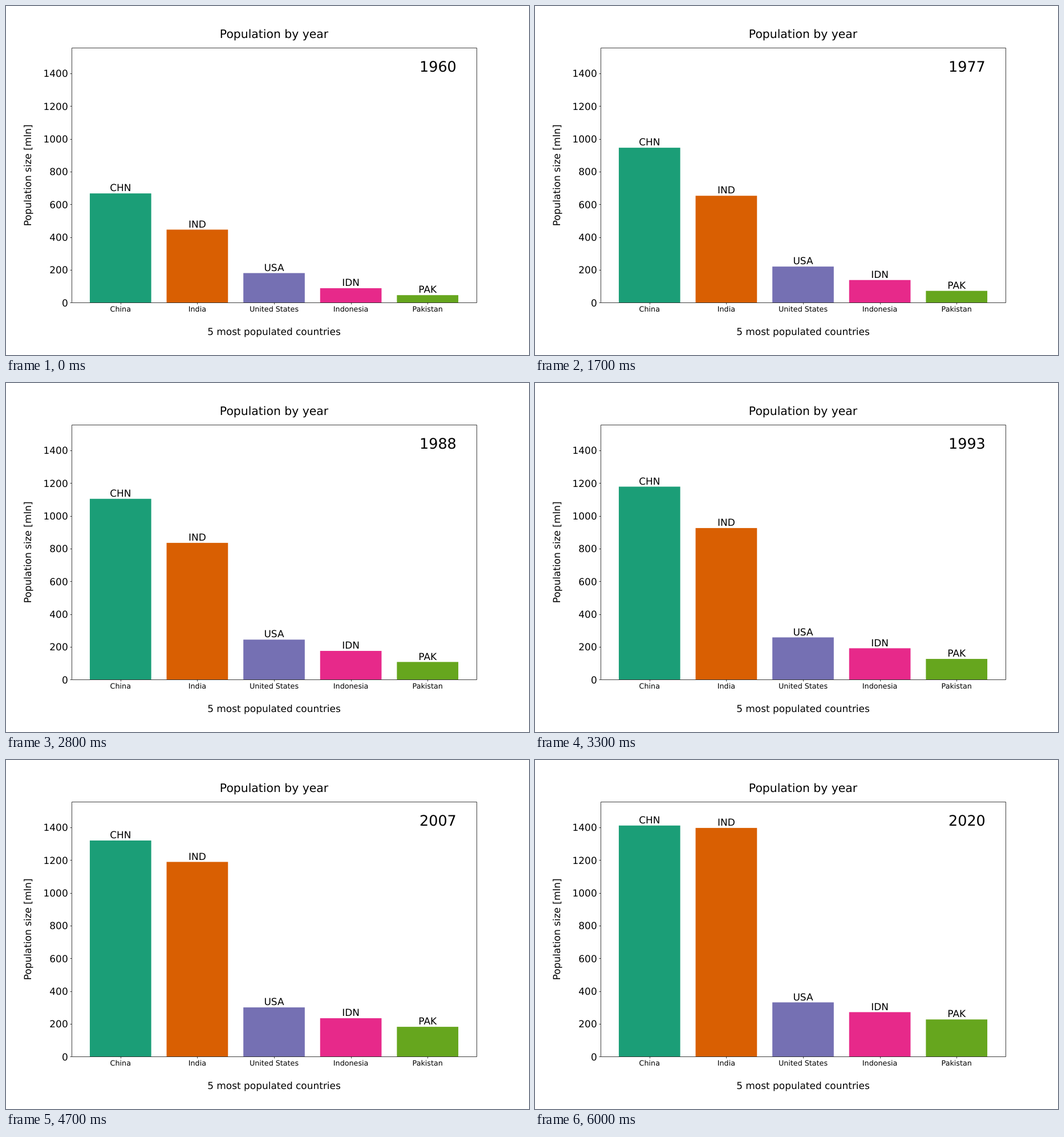
Write an HTML page that moves like this. It is 917 px wide and 611 px high and loops after 6100 ms.

```html
<!DOCTYPE html>
<html lang="en">
<head>
<meta charset="utf-8">
<title>Population by year</title>
<style>
  html, body { margin: 0; width: 100%; height: 100%; overflow: hidden; background: #fff; }
  svg { display: block; width: 917px; height: 611px; }
  text { font-family: "DejaVu Sans", sans-serif; text-rendering: geometricPrecision; }
  .axis { fill: none; stroke: #000; stroke-width: .75; }
</style>
</head>
<body>
<svg id="chart" viewBox="0 0 917 611"></svg>
<script>
const FIRST = 1960, YEARS = 61, STEP = 100;
const BASE = 519.4, SCALE = 0.2868;
const LEFT = 114.63, SLOT = 134.61, BAR = SLOT * 0.8;

// Keys are millions of people, evenly spread from the first year to the last.
const countries = [
  { name: 'China', code: 'CHN', color: '#1b9e77', keys: [667, 764, 916, 1016, 1135, 1236, 1304, 1359, 1411] },
  { name: 'India', code: 'IND', color: '#d95f02', keys: [446, 623.5, 870.5, 1154.6, 1396.4] },
  { name: 'United States', code: 'USA', color: '#7570b3', keys: [180.7, 216, 249.6, 295.5, 331.5] },
  { name: 'Indonesia', code: 'IDN', color: '#e7298a', keys: [88.3, 131.8, 182.2, 228.8, 271.9] },
  { name: 'Pakistan', code: 'PAK', color: '#66a61e', keys: [46, 67.2, 115.4, 175, 227.2] }
];

const chart = document.getElementById('chart');

function add(tag, attrs, content = '') {
  const el = document.createElementNS('http://www.w3.org/2000/svg', tag);
  for (const key in attrs) el.setAttribute(key, attrs[key]);
  el.textContent = content;
  return chart.appendChild(el);
}

function label(content, x, y, size = 16.97, anchor = 'middle') {
  return add('text', { x, y, 'text-anchor': anchor, 'font-size': size }, content);
}

const line = d => add('path', { class: 'axis', d });
const yOf = value => BASE - value * SCALE;

// Catmull-Rom curve through the keys, u from 0 to 1.
function curve(keys, u) {
  const last = keys.length - 1;
  const i = Math.min(Math.floor(u * last), last - 1), t = u * last - i;
  const b = keys[i], c = keys[i + 1];
  const a = keys[i - 1] ?? 2 * b - c, d = keys[i + 2] ?? 2 * c - b;
  return b + t / 2 * (c - a + t * (2 * a - 5 * b + 4 * c - d + t * (3 * (b - c) + d - a)));
}

countries.forEach((c, i) => {
  const mid = LEFT + SLOT * (i + 0.64);
  c.bar = add('rect', { x: mid - BAR / 2, width: BAR, fill: c.color });
  c.tag = label(c.code, mid, 0);
  label(c.name, mid, 535, 12.73);
  line(`M${Math.round(mid) + 0.5} 519.5v3`);
});

for (let v = 0; v <= 1400; v += 200) {
  const y = yOf(v);
  label(v, 108.7, y + 6.3, 16.97, 'end');
  line(`M115.5 ${Math.round(y) + 0.5}h-3`);
}

line('M115.5 73.5H825.5V519.5H115.5Z');
label('Population by year', 470, 56, 20.37);
label('5 most populated countries', 470, 576.4);
label('Population size [mln]', 0, 0).setAttribute('transform', 'translate(43.6 296.4) rotate(-90)');
const yearText = label('', 789.8, 114.5, 25.46, 'end');

function draw(now) {
  const n = Math.floor(now / STEP) % YEARS;
  yearText.textContent = FIRST + n;
  for (const { bar, tag, keys } of countries) {
    const y = yOf(curve(keys, n / (YEARS - 1)));
    bar.setAttribute('y', y);
    bar.setAttribute('height', BASE - y);
    tag.setAttribute('y', y - 3.8);
  }
  requestAnimationFrame(draw);
}
draw(0);
</script>
</body>
</html>
```
